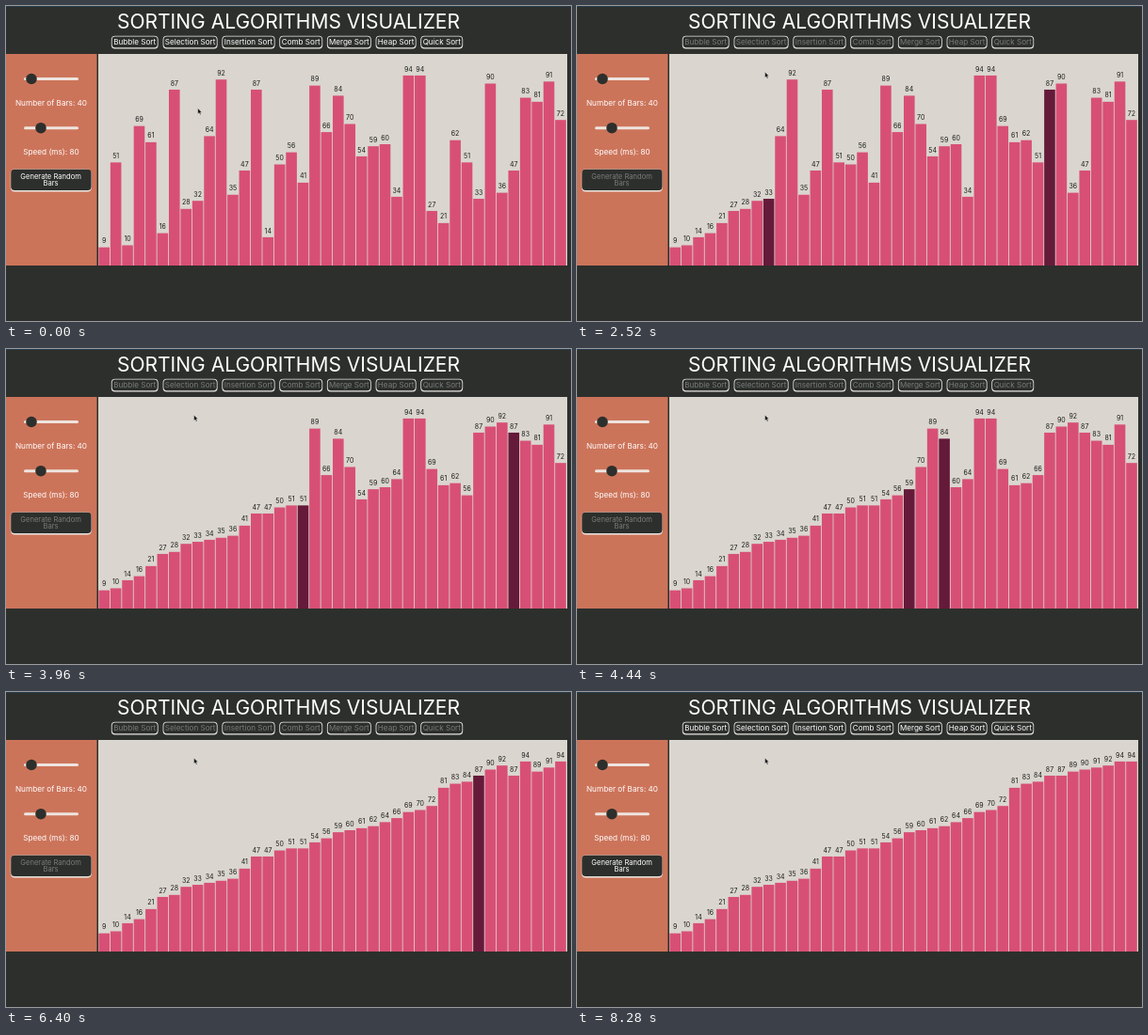
These frames come from a looping animation (600x335 px, 8.4 s). An HTML page:

```html
<!DOCTYPE html>
<html lang="en">
<head>
<meta charset="utf-8">
<title>Sorting Algorithms Visualizer</title>
<style>
  html, body { margin: 0; width: 100%; height: 100%; overflow: hidden; background: #2d2f2c; }
  svg { display: block; width: 600px; height: 335px; }
  text { font-family: Inter, sans-serif; text-anchor: middle; fill: #fff; }
  .count { font-size: 7px; fill: #1c1c1c; }
  .busy .action { fill: #7b7c79; }
</style>
</head>
<body>
<svg id="stage" viewBox="0 0 600 335"></svg>
<script>
const LOOP = 8400;
const START = 1197;      // moment of the click
const TICK = 82.67;      // one pause of the sort
const BASE = 276, UNIT = 2.15, PITCH = 12.43, LEFT = 98.4;
const INK = '#2d2f2c', PINK = '#d84f75', PLUM = '#651a39', LIGHT = '#e9e7e3';

const values = [
  9, 51, 10, 69, 61, 16, 87, 28, 32, 64, 92, 35, 47, 87, 14, 50, 56, 41, 89, 66,
  84, 70, 54, 59, 60, 34, 94, 94, 27, 21, 62, 51, 33, 90, 36, 47, 83, 81, 91, 72
];

const stage = document.getElementById('stage');

function add(tag, attrs, label) {
  const el = document.createElementNS('http://www.w3.org/2000/svg', tag);
  for (const key in attrs) el.setAttribute(key, attrs[key]);
  if (label !== undefined) el.textContent = label;
  stage.appendChild(el);
  return el;
}

function rect(x, y, width, height, fill, rx = 0) {
  return add('rect', { x, y, width, height, fill, rx });
}

function text(x, y, size, label, cls = '') {
  return add('text', { x, y, 'font-size': size, class: cls }, label);
}

function slider(y, knob) {
  rect(19, y - 1.5, 58, 3, '#eee4df', 1.5);
  add('circle', { cx: knob, cy: y, r: 5.8, fill: INK });
}

function button(x, right, label) {
  rect(x, 31.8, right - x, 13.8, LIGHT, 4);
  rect(x + 0.8, 32.5, right - x - 1.6, 11.7, INK, 3.4);
  text((x + right) / 2, 41.1, 8.1, label, 'action');
}

// Selection sort: one state per pause; a bar already in place needs only one.
function sortStates(list) {
  const a = list.slice();
  const states = [];
  for (let i = 0; i < a.length; i++) {
    states.push({ a: a.slice(), marked: [i] });
    let min = i;
    for (let j = i + 1; j < a.length; j++) if (a[j] < a[min]) min = j;
    if (min === i) continue;
    [a[i], a[min]] = [a[min], a[i]];
    states.push({ a: a.slice(), marked: [i, min] });
  }
  return { states, sorted: a };
}

rect(0, 0, 600, 335, INK);
rect(0, 0, 600, 1, '#263c4d');
text(300, 24.3, 21, 'SORTING ALGORITHMS VISUALIZER');
button(111.8, 161.6, 'Bubble Sort');
button(166.6, 224.6, 'Selection Sort');
button(229.4, 285.6, 'Insertion Sort');
button(290.3, 336.2, 'Comb Sort');
button(340.9, 387.8, 'Merge Sort');
button(392.6, 435.6, 'Heap Sort');
button(440.3, 485.2, 'Quick Sort');

rect(0, 51, 96.5, 225, '#cc745a');
slider(77.5, 27);
text(48, 106, 8.2, 'Number of Bars: 40');
slider(129.7, 37);
text(48, 158, 8.2, 'Speed (ms): 80');
rect(4.8, 173.6, 86.2, 24, LIGHT, 4.5);
rect(5.2, 173.8, 85.4, 22.2, INK, 4);
text(47.6, 184.2, 7.6, 'Generate Random', 'action');
text(47.6, 191.3, 7.6, 'Bars', 'action');

rect(98, 51, 498, 225, '#dad6cf');
const bars = values.map((_, i) => {
  const x = LEFT + i * PITCH;
  return { box: rect(x, 0, 11.6, 0, PINK), label: text(x + 5.8, 0, 7, '', 'count') };
});

const cursor = add('path', {
  d: 'M0 0V6L1.4 4.8L2.4 7L3.4 6.5L2.5 4.4H4.3Z',
  fill: '#111', stroke: '#eee', 'stroke-width': 0.4
});

const { states, sorted } = sortStates(values);

// Pointer path: time, x, y
const path = [[0, 203.7, 108.8], [160, 203.7, 108.8], [760, 197.5, 38.5],
  [1230, 197.5, 38.5], [1560, 199, 70.3], [1700, 199, 70.3], [1840, 199.6, 70.2]];

function pointer(t) {
  const k = path.findIndex(p => p[0] > t);
  if (k < 0) return path[path.length - 1].slice(1);
  const [t0, x0, y0] = path[k - 1], [t1, x1, y1] = path[k];
  const u = (t - t0) / (t1 - t0), e = u * u * (3 - 2 * u);
  return [x0 + (x1 - x0) * e, y0 + (y1 - y0) * e];
}

function draw(t) {
  const step = Math.floor((t - START) / TICK);
  const busy = step >= 0 && step < states.length;
  const { a, marked } = busy ? states[step] : { a: step < 0 ? values : sorted, marked: [] };
  stage.classList.toggle('busy', busy);
  bars.forEach(({ box, label }, i) => {
    const height = a[i] * UNIT;
    box.setAttribute('y', BASE - height);
    box.setAttribute('height', height);
    box.setAttribute('fill', marked.includes(i) ? PLUM : PINK);
    label.setAttribute('y', BASE - height - 4.4);
    label.textContent = a[i];
  });
  cursor.setAttribute('transform', `translate(${pointer(t)})`);
}

const begin = performance.now();
function tick() {
  draw((performance.now() - begin) % LOOP);
  requestAnimationFrame(tick);
}
draw(0);
requestAnimationFrame(tick);
</script>
</body>
</html>
```
